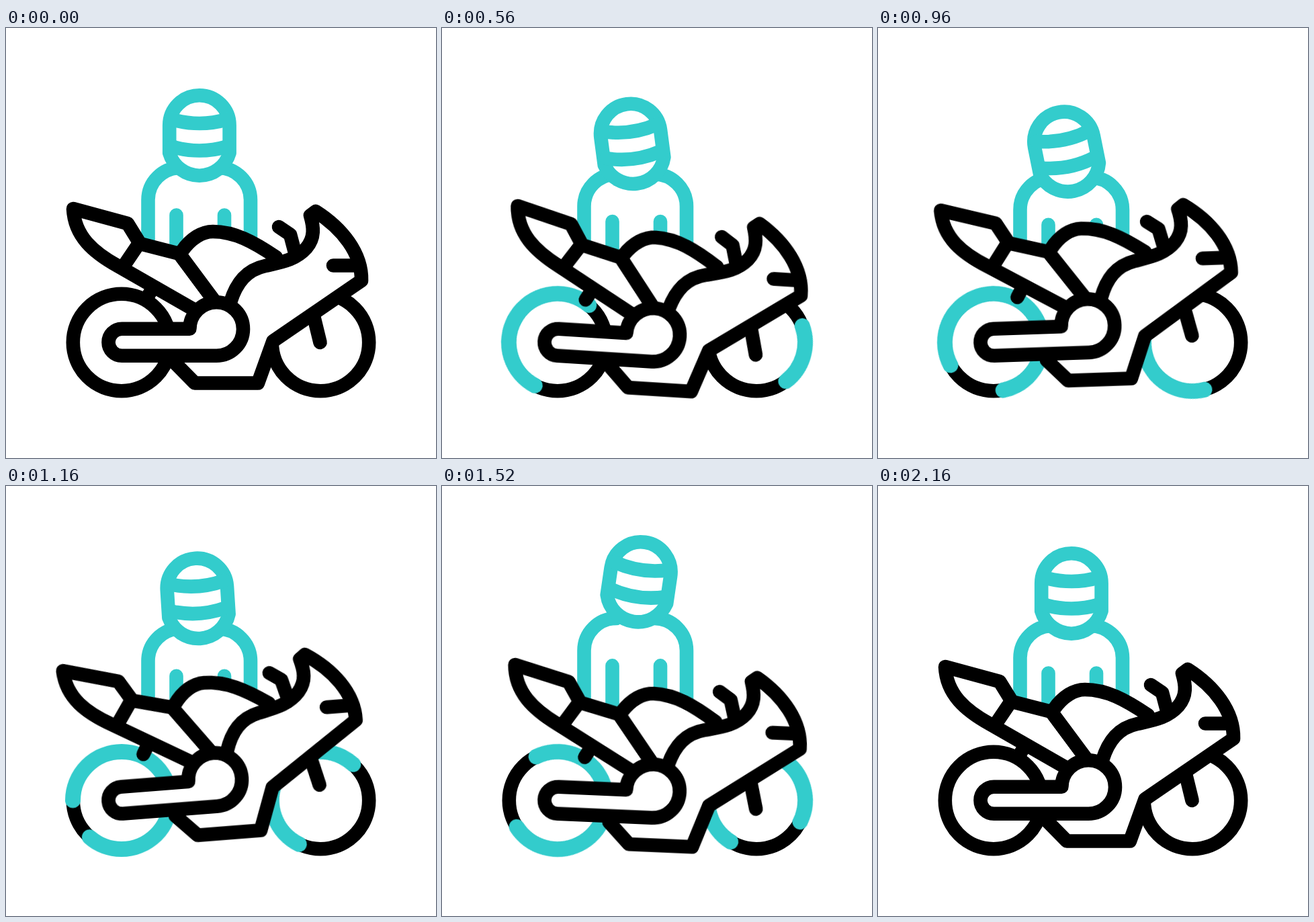
Write an HTML page that moves like this. It is 640 px wide and 640 px high and loops after 2.44 s.

```html
<!DOCTYPE html>
<html lang="en">
<head>
<meta charset="utf-8">
<title>Rider and motorcycle</title>
<style>
  html, body { margin: 0; width: 100%; height: 100%; overflow: hidden; background: #fff; }
  svg { display: block; width: 100vw; height: 100vh; }
  svg * { stroke-width: 20.6; stroke-linejoin: round; stroke-linecap: round; }

  .bike, .wheels { stroke: #000; fill: #fff; }
  .rider, .trail { stroke: #3cc; fill: #fff; }
  .line, .trail { fill: none; }
  .trail { stroke-width: 23; opacity: 0; }

  /* One loop is 2440 ms; everything rests from 2160 ms on. */
  .bike, .body, .head {
    animation: 2440ms cubic-bezier(.37, 0, .63, 1) infinite;
  }
  .bike { transform-origin: 172px 468px; animation-name: rock; }
  .body { animation-name: breathe; }
  .head { transform-origin: 288px 200px; animation-name: bob, tilt; }
  .rear  { transform-origin: 172px 468px; animation: rear 2440ms linear infinite, rear-show 2440ms step-end infinite; }
  .front { transform-origin: 468px 468px; animation: front 2440ms linear infinite, front-show 2440ms step-end infinite; }

  @keyframes rock {
    0% { rotate: 0deg; }
    26.64% { rotate: 3.75deg; }
    47.13% { rotate: -4.5deg; }
    59.84% { rotate: 3.6deg; }
    69.67% { rotate: -4deg; animation-timing-function: cubic-bezier(.39, .575, .565, 1); }
    88.52%, 100% { rotate: 0deg; }
  }
  @keyframes breathe {
    0% { translate: 0 0; }
    38.52% { translate: 0 14.5px; }
    59.84% { translate: 0 -12px; }
    73.77%, 100% { translate: 0 0; }
  }
  @keyframes bob {
    0% { translate: 0 0; }
    4.1% { translate: 0 -7px; animation-timing-function: cubic-bezier(.33, .15, .67, 1); }
    38.52% { translate: 0 23.5px; }
    59.84% { translate: 0 -19px; }
    73.77%, 100% { translate: 0 0; }
  }
  @keyframes tilt {
    0% { rotate: 0deg; }
    38.52% { rotate: -11.5deg; }
    59.84% { rotate: 9deg; }
    73.77%, 100% { rotate: 0deg; }
  }
  /* rotate = start of the arc, first dash = its length in degrees */
  @keyframes rear {
    0% { rotate: 108deg; stroke-dasharray: 0 360; }
    14.75% { rotate: 111.5deg; stroke-dasharray: 122 360; }
    31.15% { rotate: 124deg; stroke-dasharray: 262 360; }
    47.54% { rotate: 180deg; stroke-dasharray: 311 360; }
    61.48%, 100% { rotate: 244deg; stroke-dasharray: 263 360; }
  }
  @keyframes front {
    0%, 14.75% { rotate: -75deg; stroke-dasharray: 0 360; }
    22.95% { rotate: -20deg; stroke-dasharray: 72 360; }
    31.15% { rotate: 35deg; stroke-dasharray: 150 360; }
    47.54% { rotate: 116deg; stroke-dasharray: 196 360; }
    61.48%, 100% { rotate: 122deg; stroke-dasharray: 264 360; }
  }
  @keyframes rear-show {
    0% { opacity: 0; }
    1.23% { opacity: 1; }
    88.52%, 100% { opacity: 0; }
  }
  @keyframes front-show {
    0% { opacity: 0; }
    14.8% { opacity: 1; }
    88.52%, 100% { opacity: 0; }
  }
</style>
</head>
<body>
<svg viewBox="0 0 640 640">
  <g class="rider">
    <g class="body line">
      <path d="M211.5 350V256A48 48 0 0 1 259.5 208"/>
      <path d="M364 350V256A48 48 0 0 0 316 208"/>
      <path d="M253.5 350V278.5M325 350V278.5"/>
    </g>
    <g class="head">
      <path d="M243.2 186V145A44.7 44.7 0 0 1 332.6 145V186A46.5 46.5 0 0 1 243.2 186Z"/>
      <path class="line" d="M247 136Q288 148 329 136M247 176.5Q288 188.5 329 176.5"/>
    </g>
  </g>

  <g class="wheels line">
    <circle cx="172" cy="468" r="72.2"/>
    <circle cx="468" cy="468" r="72.2"/>
  </g>
  <circle class="trail rear" cx="172" cy="468" r="72.5" pathLength="360"/>
  <circle class="trail front" cx="468" cy="468" r="72.5" pathLength="360"/>

  <g class="bike">
    <!-- bracket, handlebar -->
    <path class="line" d="M220 384L209.7 402M406 296L423 307.5L430 334"/>
    <!-- tail and seat frame -->
    <path d="M283 421L167 354.5C130 334 102 310 100 269L181 291L199.5 321L258 336L313 410"/>
    <path class="line" d="M197 322L176 353"/>
    <!-- tank -->
    <path d="M313 410L258 336L262 332C275 313 292 303 308 303C340 303 368 318 402 341"/>
    <!-- fairing -->
    <path d="M334 408C343 379 358 360 386 354C410 348.5 431 345.5 447 327.5C460 312 458 296 453 279L461 273C500 298 530 335 529 376L397.5 466L375 528.5H281L250 497"/>
    <!-- headlight, fork -->
    <path class="line" d="M487 353.5H524M458.5 431L467.5 468"/>
    <!-- swingarm -->
    <path d="M172.5 447.8H273.4A39.8 39.8 0 1 1 313 487.8H172.5A20 20 0 0 1 172.5 447.8Z"/>
  </g>
</svg>
</body>
</html>
```
